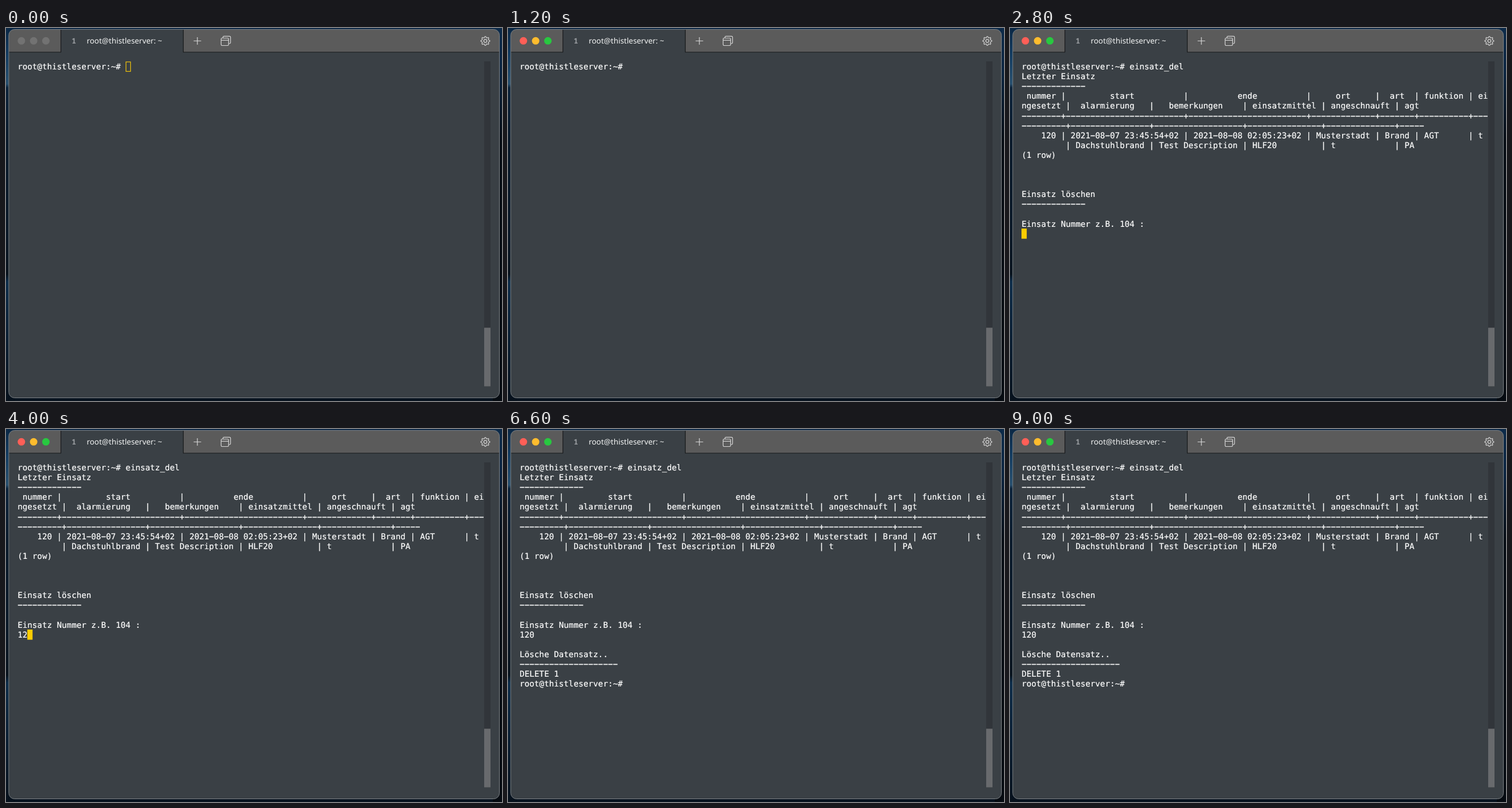
An HTML page for the animation above (9200 ms loop, 863x649 px).

```html
<!DOCTYPE html>
<html lang="de">
<head>
<meta charset="utf-8">
<title>Terminal</title>
<style>
  html, body { margin: 0; width: 100%; height: 100%; overflow: hidden; background: #08131f; }
  svg { display: block; }
  text { white-space: pre; text-rendering: geometricPrecision; }
  #screen { font: 14.207px "DejaVu Sans Mono", monospace; fill: #fff; stroke: #fff; stroke-width: .2; }
  .title { font: 13.4px "Noto Sans", sans-serif; fill: #f4f5f5; }
  .index { font: bold 13px "Noto Sans Mono", monospace; fill: #999ca0; }
  .icon { fill: none; stroke: #d6d6d6; stroke-width: 1.2; stroke-linejoin: round; }
</style>
</head>
<body>
<svg width="863" height="649" viewBox="0 0 863 649">
  <defs>
    <linearGradient id="sea" x2="0" y2="1">
      <stop offset="0" stop-color="#0b2845"/>
      <stop offset=".07" stop-color="#123b60"/>
      <stop offset=".15" stop-color="#28506f"/>
      <stop offset=".16" stop-color="#0b233b"/>
      <stop offset=".3" stop-color="#0a1a2b"/>
      <stop offset=".55" stop-color="#0a1827"/>
      <stop offset=".66" stop-color="#09131d"/>
      <stop offset=".68" stop-color="#0d2d4a"/>
      <stop offset=".78" stop-color="#0b233a"/>
      <stop offset="1" stop-color="#07111c"/>
    </linearGradient>
    <linearGradient id="shore" x2="0" y2="1">
      <stop offset="0" stop-color="#0c2a49"/>
      <stop offset=".12" stop-color="#0b2440"/>
      <stop offset=".3" stop-color="#070d14"/>
      <stop offset="1" stop-color="#060b11"/>
    </linearGradient>
    <clipPath id="frame"><rect x="5" y="2.5" width="853.5" height="641" rx="10"/></clipPath>
  </defs>

  <rect width="863" height="649" fill="#08131f"/>
  <rect width="863" height="14" fill="#0c2745"/>
  <rect width="16" height="649" fill="url(#sea)"/>
  <rect x="847" width="16" height="649" fill="url(#shore)"/>

  <g clip-path="url(#frame)">
    <rect width="863" height="649" fill="#3a4045"/>
    <path d="M0 0H95V42H0ZM309 0H863V42H309Z" fill="#5b5b5b"/>
    <path d="M0 42H95.5V0M863 42H308.5V0" fill="none" stroke="#16181a" stroke-width="1.2"/>
  </g>
  <rect x="4.8" y="2.5" width="853.7" height="641" rx="10" fill="none" stroke="#7d8286"/>

  <g id="lights">
    <circle cx="26.8" cy="22.3" r="6.5"/>
    <circle cx="48.1" cy="22.3" r="6.5"/>
    <circle cx="69.4" cy="22.3" r="6.5"/>
  </g>
  <text class="index" x="114.3" y="27">1</text>
  <text class="title" x="140.5" y="27">root@thistleserver: ~</text>
  <g class="icon">
    <path d="M326.5 22.5H339.5M333 16V29"/>
    <path d="M377.5 17.5V16Q377.5 14.3 379.2 14.3H389Q390.7 14.3 390.7 16V25.3Q390.7 27 389 27H387.5"/>
    <rect x="374.3" y="17.5" width="13" height="13" rx="1.7"/>
    <path d="M374.3 21.3H387.3"/>
    <circle cx="834" cy="22.5" r="2.7"/>
    <path id="gear"/>
  </g>

  <rect x="832" y="58" width="11" height="565.5" fill="#31353a"/>
  <rect x="832" y="521.5" width="11" height="102" fill="#686a6d"/>

  <rect id="cursor"/>
  <g id="screen"></g>
</svg>

<script>
const LOOP = 9200, COLS = 95, ROWS = 23;
const LEFT = 20.2, TOP = 58.6, CELL = 8.553, LINE = 17.09;
const PROMPT = 'root@thistleserver:~# ';
const $ = id => document.getElementById(id);
const rule = n => '-'.repeat(n);

// Column name, width and value of the query result
const table = [
  ['nummer', 8, '   120'],
  ['start', 24, '2021-08-07 23:45:54+02'],
  ['ende', 24, '2021-08-08 02:05:23+02'],
  ['ort', 13, 'Musterstadt'],
  ['art', 7, 'Brand'],
  ['funktion', 10, 'AGT'],
  ['eingesetzt', 12, 't'],
  ['alarmierung', 16, 'Dachstuhlbrand'],
  ['bemerkungen', 18, 'Test Description'],
  ['einsatzmittel', 15, 'HLF20'],
  ['angeschnauft', 14, 't'],
  ['agt', 5, 'PA']
];
const center = (s, n) => s.padStart(s.length + Math.floor((n - s.length) / 2)).padEnd(n);
const wrap = s => s.match(new RegExp(`.{1,${COLS}}`, 'g')).join('\n');
const row = (cell, sep) => wrap(table.map(cell).join(sep));

const listing = [
  '', 'Letzter Einsatz', rule(13),
  row(([name, n]) => center(name, n), '|'),
  row(([, n]) => rule(n), '+'),
  row(([, n, value]) => (' ' + value).padEnd(n), '|'),
  '(1 row)', '', '', '',
  'Einsatz löschen', rule(13), '',
  'Einsatz Nummer z.B. 104 :', ''
].join('\n');
const result = ['', '', 'Lösche Datensatz..', rule(20), 'DELETE 1', PROMPT].join('\n');

// Time, text added to the screen, cursor look
const steps = [
  [0, PROMPT, 'hollow'],
  [400, '', 'block'],
  [1000, '', 'off'],
  ...'einsatz_del '.match(/../g).map((pair, i) => [1400 + i * 200, pair, 'block']),
  [2800, listing, 'block'],
  [3400, '', 'off'],
  [3800, '1', 'block'],
  [4000, '2', 'block'],
  [4600, '0', 'block'],
  [5200, '', 'off'],
  [5800, '', 'block'],
  [6000, result, 'block'],
  [6600, '', 'off'],
  [7200, '', 'block'],
  [7800, '', 'off'],
  [8400, '', 'block'],
  [9000, '', 'off']
];

function setAttrs(el, attrs) {
  for (const key in attrs) el.setAttribute(key, attrs[key]);
}

const rows = Array.from({ length: ROWS }, (_, i) => {
  const el = document.createElementNS($('screen').namespaceURI, 'text');
  setAttrs(el, { x: LEFT, y: TOP + 13.5 + i * LINE });
  return $('screen').appendChild(el);
});

const gear = Array.from({ length: 32 }, (_, i) => {
  const a = (i - 0.5) * Math.PI / 16 - Math.PI / 2;
  const r = i % 4 < 2 ? 7.8 : 5.9;
  return `${834 + r * Math.cos(a)} ${22.5 + r * Math.sin(a)}`;
});
$('gear').setAttribute('d', `M${gear.join('L')}Z`);

function drawCursor(look, col, line) {
  const inset = look === 'hollow' ? 0.6 : 0;
  setAttrs($('cursor'), {
    x: LEFT - 0.2 + col * CELL + inset,
    y: TOP - 0.2 + line * LINE + inset,
    width: 9.1 - 2 * inset,
    height: 17.7 - 2 * inset,
    fill: look === 'block' ? '#ffcc00' : 'none',
    stroke: look === 'hollow' ? '#f0c30a' : 'none',
    'stroke-width': 1.2
  });
}

function drawLights(active) {
  const colors = active ? ['#ff5f57', '#febc2e', '#28c840'] : Array(3).fill('#727272');
  [...$('lights').children].forEach((dot, i) => dot.setAttribute('fill', colors[i]));
}

function draw(t) {
  const done = steps.filter(([at]) => at <= t);
  const lines = done.map(([, text]) => text).join('').split('\n');
  // The terminal face has wide hyphens that nearly join
  rows.forEach((el, i) => { el.textContent = (lines[i] || '').replace(/-/g, '−'); });
  drawCursor(done[done.length - 1][2], lines[lines.length - 1].length, lines.length - 1);
  drawLights(t >= 200);
}

const start = performance.now();
let last = -1;
function tick() {
  const t = (performance.now() - start) % LOOP;
  const slot = Math.floor(t / 200);
  if (slot !== last) draw(t);
  last = slot;
  requestAnimationFrame(tick);
}
tick();
</script>
</body>
</html>
```
